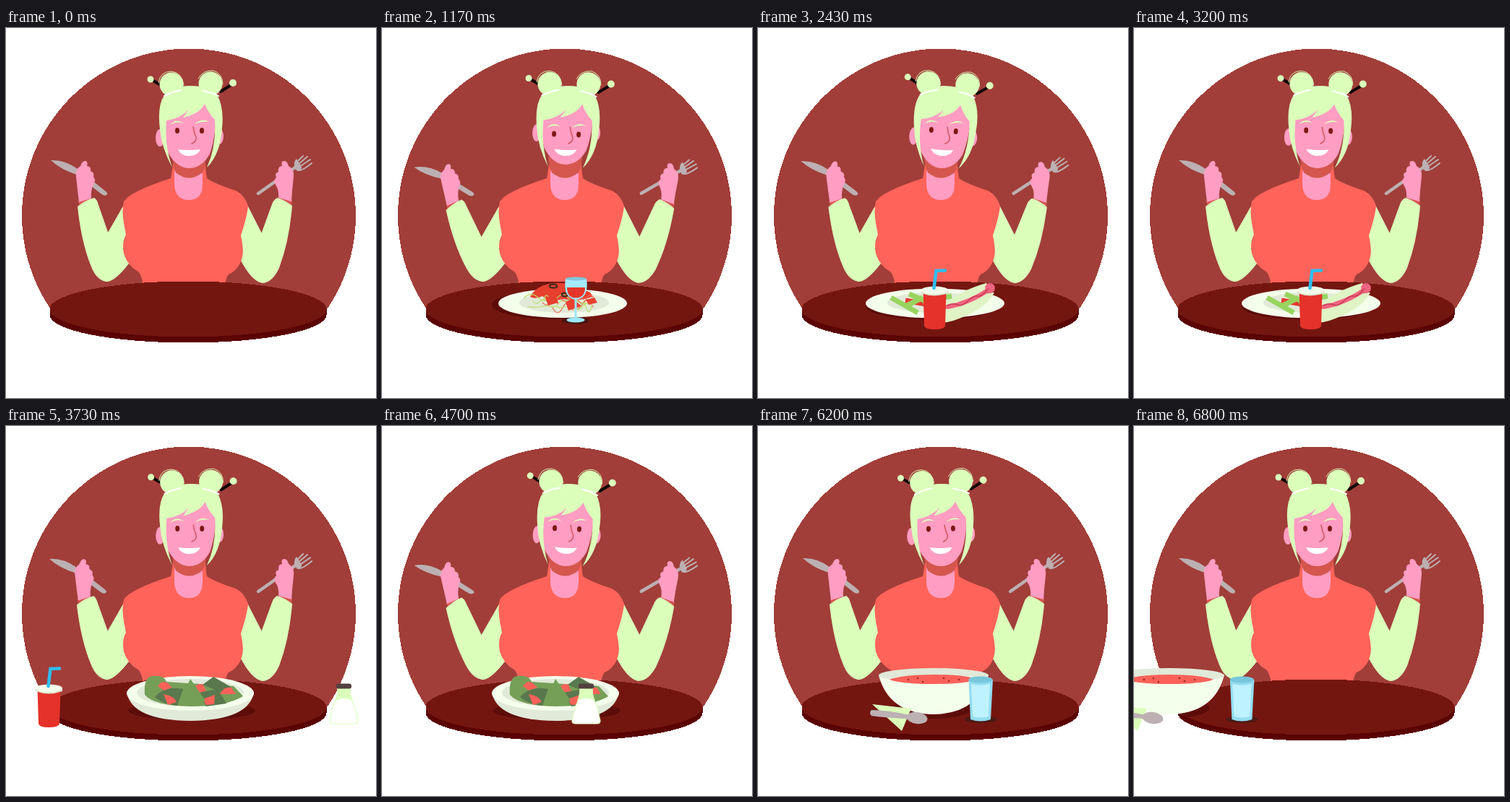
These frames come from a looping animation (512 by 512 pixels, 6.86 s). An HTML page:

```html
<!DOCTYPE html>
<html lang="en">
<head>
<meta charset="utf-8">
<title>Dinner</title>
<style>
html, body { margin: 0; width: 100%; height: 100%; overflow: hidden; background: #fff }
svg { display: block; width: 100%; height: 100% }
.hair { fill: #dbffbb }
.skin { fill: #ff9dc2 }
.steel { fill: #bcb0b3 }
.line { fill: none; stroke-linecap: round }
.crisp { shape-rendering: crispEdges }
.shade { fill: #5c0d09 }
.plate { fill: #f3feeb }
.well { fill: #e1e9d8 }
.red { fill: #fa6259 }
.leaf { fill: #759f57 }
.dark { fill: #5a784e }
</style>
</head>
<body>
<svg viewBox="0 0 512 512">
  <clipPath id="top"><ellipse cx="252" cy="389" rx="191" ry="38.5"/></clipPath>
  <path class="crisp" d="M61 388A231 231 0 1 1 445 388Z" fill="#a13e39"/>

  <!-- upper arms -->
  <path class="hair" d="M164 243L137 290Q125 336 138 351Q150 352 170 326ZM333 243L357 290Q369 336 355 353Q340 351 324 320L320 260Z"/>

  <g id="left">
    <path fill="#d4564d" d="M100 238L118 234L119 239L101 245Z"/>
    <path class="steel" d="M62 183Q81 182 99 195L138 226Q142 230 139 231Q136 233 131 229L98 203Q76 196 62 183Z"/>
    <path class="skin" d="M97 206Q95 196 103 191Q106 183 110 184Q114 185 112 191Q118 191 117 198Q123 200 121 206Q125 210 121 216Q117 226 118 236L101 241Q99 225 97 206Z"/>
    <path class="hair" d="M99 247Q110 238 122 235Q126 237 128 245L143 288Q158 330 140 351Q125 350 117 328Q104 295 99 247Z"/>
  </g>
  <g id="right">
    <path fill="#d4564d" d="M377 234L396 239L395 246L376 238Z"/>
    <path class="line" stroke="#bcb0b3" stroke-width="4.5" d="M349 229L403 191"/>
    <path class="steel" d="M399 193Q398 184 402 181L409 192Q409 198 403 198Z"/>
    <path class="line" stroke="#bcb0b3" stroke-width="2" d="M402 186L411 177M404 189L417 178M406 192L421 182M406 197Q411 197 423 187"/>
    <path class="skin" d="M398 206Q399 195 391 191Q389 183 384 184Q380 185 382 191Q376 191 377 199Q371 201 374 207Q369 211 373 217Q378 224 377 235L395 240Q396 222 398 206Z"/>
    <path class="hair" d="M396 246Q386 238 375 235Q370 238 368 244L352 288Q337 332 355 353Q369 352 378 332Q392 295 396 246Z"/>
  </g>

  <path fill="#ff6359" d="M231 189Q229 203 228 208Q172 226 163 240Q160 252 163 270L166 286Q160 296 163 312Q168 329 184 338Q188 344 190 356H303Q304 346 308 341Q327 332 328 308Q327 296 325 287Q334 260 335 246Q330 231 318 225Q290 216 278 208Q276 196 276 189Z"/>
  <path class="skin" d="M233 186V218Q235 238 253 238Q271 238 272 218V186Z"/>
  <path fill="#d4564d" d="M230 178Q231 194 235 200Q253 215 272 200Q276 194 277 178Z"/>

  <g id="head">
    <path class="line" stroke="#100505" stroke-width="4" d="M204 73L216 80M297 88L311 79"/>
    <g class="hair">
      <circle cx="200" cy="71" r="4.5"/><circle cx="314" cy="76" r="5"/>
      <circle cx="229" cy="78" r="16.5"/><circle cx="283" cy="77" r="16.5"/>
    </g>
    <path class="line" stroke="#dbffbb" stroke-width=".9" d="M211 76Q213 60 229 60Q244 62 246 79M266 70Q272 58 287 59Q300 63 300 78"/>
    <g id="ears" class="skin"><ellipse cx="213" cy="152" rx="6" ry="12"/><ellipse cx="295" cy="150" rx="6" ry="11"/></g>
    <path id="face" class="skin" d="M218 105Q217 150 224 172Q236 194 254 194Q272 193 282 174Q291 150 291 105Z"/>
    <path class="hair" d="M230 193Q215 165 213 140Q209 108 219 93Q233 80 255 80Q282 80 292 92Q302 110 299 138Q297 174 278 193Q291 165 289 127Q280 118 275 105Q268 119 245 124L253 113Q240 126 222 128Q219 162 230 193Z"/>
    <path class="line" stroke="#fff" stroke-width="2" d="M219 94Q230 88 242 86M272 87Q285 89 294 94"/>
    <g id="eyes">
      <path class="hair" d="M227 134Q235 124 246 132Q236 128 227 134ZM261 133Q272 124 281 130Q271 128 261 133Z"/>
      <g fill="#7d1713"><ellipse cx="237" cy="142" rx="3" ry="4"/><ellipse cx="271" cy="142" rx="3" ry="4"/></g>
    </g>
    <path class="line" stroke="#d0505a" stroke-width="1.4" d="M259 137Q260 145 263 151Q264 157 257 160"/>
    <path fill="#fff" d="M238 168Q254 170 269 168Q265 177 253 177Q242 177 238 168Z"/>
  </g>

  <g class="crisp">
    <path fill="#5b0303" d="M60.500 388V397A191.500 38.500 0 0 0 443.500 397V388Z"/>
    <ellipse cx="252" cy="389" rx="191.500" ry="38.500" fill="#741610"/>
  </g>

  <g clip-path="url(#top)" class="shade">
    <ellipse data-t="-20,1620" cx="238" cy="383" rx="86" ry="20"/>
    <ellipse data-t="150,1790" cx="268" cy="405" rx="19" ry="5" fill="#4a1410"/>
    <ellipse data-t="1620,3260" cx="240" cy="385" rx="91" ry="19"/>
    <ellipse data-t="3260,4900" cx="242" cy="394" rx="88" ry="13"/>
    <ellipse data-t="4900,6495" cx="243" cy="390" rx="55" ry="15"/>
    <ellipse data-t="4920,6515" cx="308" cy="406" rx="22" ry="5" fill="#4a1a16"/>
  </g>

  <!-- pasta -->
  <g data-t="-20,1620">
    <ellipse class="plate" cx="250" cy="381" rx="89" ry="20"/>
    <ellipse class="well" cx="252" cy="380" rx="62" ry="14"/>
    <path fill="#e8402f" d="M205 372Q212 357 236 353Q262 351 276 363Q290 363 291 372Q270 379 252 375Q230 380 222 371Q212 376 205 372Z"/>
    <g id="noodles" class="line" stroke-width="1.2"></g>
    <path fill="#e8402f" d="M226 374L240 368L244 380L230 384ZM254 380L264 374L276 385L258 391ZM282 376L294 373L298 380L286 383Z"/>
    <g fill="none" stroke="#4a2c22" stroke-width="2.5"><ellipse cx="237" cy="357" rx="5" ry="2.500"/><ellipse cx="253" cy="369" rx="4" ry="2.200"/><ellipse cx="259" cy="360" rx="5" ry="2.500"/></g>
  </g>
  <g data-t="150,1790">
    <ellipse cx="268" cy="404" rx="12.500" ry="3.500" fill="#9be8fa"/>
    <path class="line" stroke="#9be8fa" stroke-width="3" d="M268 373V403"/>
    <path fill="#a5eafa" d="M254 347H283Q287 374 268 376Q250 374 254 347Z"/>
    <path fill="#e5352b" d="M256 359H281Q281 373 268 373.500Q256 373 256 359Z"/>
    <ellipse cx="268.500" cy="347" rx="14.500" ry="2.500" fill="#7fc8d8"/>
  </g>

  <!-- hot dog and fries -->
  <g data-t="1620,3260">
    <ellipse class="plate" cx="245" cy="381" rx="96" ry="20.500"/>
    <ellipse class="well" cx="245" cy="380" rx="66" ry="14"/>
    <path stroke="#e8382d" stroke-width="7" d="M204 377L232 382"/>
    <path stroke="#98d45f" stroke-width="7" fill="none" d="M184 373L221 394M209 368L232 378M204 385L228 373M228 379L268 371"/>
    <path fill="#dff3c4" d="M256 384Q282 362 316 353L321 360Q290 376 258 388Z"/>
    <path fill="#dff3c4" d="M254 390Q284 384 300 375Q318 365 327 366Q318 384 290 397Q270 407 254 408Z"/>
    <path class="line" stroke="#f0647f" stroke-width="6" d="M262 386Q292 381 321 361"/>
    <circle cx="321" cy="360" r="7" fill="#f0647f"/>
    <path class="line" stroke="#c93a55" stroke-width="1.500" d="M262 384Q270 380 276 383T290 378T304 371T318 361"/>
  </g>
  <g data-t="1790,3430">
    <path fill="#e5322a" d="M228.500 364L230 412Q231 417 244 417Q258 417 259 412L260.500 364Z"/>
    <path fill="#dbe6d0" d="M226 363V367Q244 374 263 367V363Z"/>
    <ellipse cx="244.500" cy="363" rx="18.500" ry="5.500" fill="#f3fbea"/>
    <path class="line" stroke="#30bdf0" stroke-width="4.5" d="M243.500 360L246.500 336L259 335.500"/>
  </g>

  <!-- salad -->
  <g data-t="3260,4900">
    <path class="well" d="M152 368Q158 407 240 408Q322 407 328 368Z"/>
    <ellipse class="plate" cx="240" cy="370" rx="88" ry="24"/>
    <ellipse class="well" cx="240" cy="369" rx="74" ry="19"/>
    <path class="leaf" d="M177 372Q175 348 187 346Q204 344 207 354L300 360L313 374Q290 388 240 388Q190 387 177 372Z"/>
    <path class="dark" d="M191 375Q206 358 230 364L222 387Q200 384 191 375ZM257 358L272 347L296 361L284 369ZM250 369L278 364L290 384L262 388Z"/>
    <path class="red" d="M195 360Q199 352 208 355L215 362L203 366ZM203 371Q217 373 221 382L209 386ZM246 362Q250 355 258 358L262 367L250 369ZM257 378L274 372L273 385L262 386ZM281 371Q286 360 297 362L303 371Z"/>
    <path class="leaf" d="M225 383L240 350L261 380Q245 386 225 383Z"/>
  </g>
  <g data-t="3430,5070">
    <path fill="#fff" stroke="#dbffbb" stroke-width="1.200" d="M274 362Q274 378 267 389L263 408Q263 412 268 412H297Q302 412 302 408L298 389Q291 378 291 362Z"/>
    <path class="hair" d="M274 362Q274 372 270 380Q283 374 295 380Q291 372 291 362Z"/>
    <rect x="272" y="356.500" width="21" height="7" rx="3" fill="#54403f"/>
  </g>

  <!-- soup -->
  <g data-t="4900,6495">
    <path class="plate" d="M167 345Q181 398 243 399Q305 398 319 345Z"/>
    <ellipse class="well" cx="243" cy="345" rx="76" ry="10"/>
    <path class="plate" d="M169 348Q205 358 243 358Q281 358 317 348L310 365H176Z"/>
    <path class="red" d="M182 351Q200 344 243 344Q286 344 304 351Q286 357 243 357Q200 357 182 351Z"/>
    <g fill="#9c2a22"><circle cx="208" cy="351" r="1.300"/><circle cx="221" cy="349" r="1.300"/><circle cx="228" cy="354" r="1.300"/><circle cx="257" cy="349" r="1.300"/><circle cx="264" cy="353" r="1.300"/><circle cx="278" cy="351" r="1.300"/></g>
    <path class="hair" d="M158 385L212 391L199 422Z"/>
    <path class="steel" d="M157 393Q180 393 209 400L208 405Q180 404 157 401Q153 397 157 393Z"/>
    <ellipse class="steel" cx="220" cy="404" rx="14.500" ry="8" transform="rotate(8 220 404)"/>
  </g>
  <g data-t="4920,6515">
    <path fill="#93dcf0" d="M291.500 351L294 406Q308 411 322 406L325 351Z"/>
    <path fill="#bff2ff" d="M295 357Q308 360 321 357L319 402Q308 405 297 402Z"/>
    <ellipse cx="308" cy="351" rx="16.500" ry="4.500" fill="#78c6da"/>
  </g>
</svg>
<script>
const LOOP = 6860, SLIDE = 600, TRAVEL = 370;
const $ = id => document.getElementById(id);
const clamp = p => Math.min(1, Math.max(0, p));
const ease = p => (p = clamp(p)) < .5 ? 4 * p ** 3 : 1 - 4 * (1 - p) ** 3;

// Curly strands spread over the plate
for (let i = 0; i < 14; i++) {
  const x = 250 + 34 * Math.sin(i * 2.4), y = 380 + 7 * Math.cos(i * 1.7);
  const w = 14 + 6 * Math.sin(i), h = 7 * Math.cos(i * 2);
  const path = document.createElementNS('http://www.w3.org/2000/svg', 'path');
  path.setAttribute('d', `M${x - w} ${y}q${w / 2} ${h * 2} ${w} 0t${w} ${h / 2}`);
  path.setAttribute('stroke', i % 3 ? '#b9e06a' : '#ee6a55');
  $('noodles').append(path);
}

const movers = [...document.querySelectorAll('[data-t]')].map(el => {
  const [enter, leave] = el.dataset.t.split(',').map(Number);
  return { el, enter, leave };
});

// Head tilt in degrees at given times
const tilt = [[0, 0], [1170, 1.5], [2430, 3.5], [3730, .3], [4700, 2.5], [5530, -2.7], [6800, 0], [LOOP, 0]];
function tiltAt(t) {
  const i = tilt.findIndex(k => k[0] > t), [t0, a] = tilt[i - 1], [t1, b] = tilt[i];
  return a + (b - a) * (1 - Math.cos(Math.PI * (t - t0) / (t1 - t0))) / 2;
}

// A glance down at the first dish
const nodAt = t => ease((t - 600) / 500) - ease((t - 1300) / 500);

// Arms open and close twice per loop
const spread = (t, lag) => {
  const p = t / (LOOP / 2) % 1 - lag;
  return ease(p / .3) - ease((p - .515) / .29);
};
const place = (id, transform) => $(id).setAttribute('transform', transform);

function draw(now) {
  const t = now % LOOP, nod = nodAt(t);
  for (const { el, enter, leave } of movers) {
    const x = TRAVEL * (1 - ease((t - enter) / SLIDE) - ease((t - leave) / SLIDE));
    el.setAttribute('transform', `translate(${x})`);
  }
  place('head', `rotate(${tiltAt(t)} 255 188)`);
  place('eyes', `translate(0 ${5 * nod})`);
  place('ears', `translate(0 ${-6 * nod})`);
  place('face', `translate(0 ${-5 * nod})`);
  place('left', `rotate(${-6.6 * spread(t, 0)} 138 340)`);
  place('right', `rotate(${5 * spread(t, .045)} 356 342)`);
}

let start;
function frame(now) {
  start ??= now;
  draw(now - start);
  requestAnimationFrame(frame);
}
draw(0);
requestAnimationFrame(frame);
</script>
</body>
</html>
```
